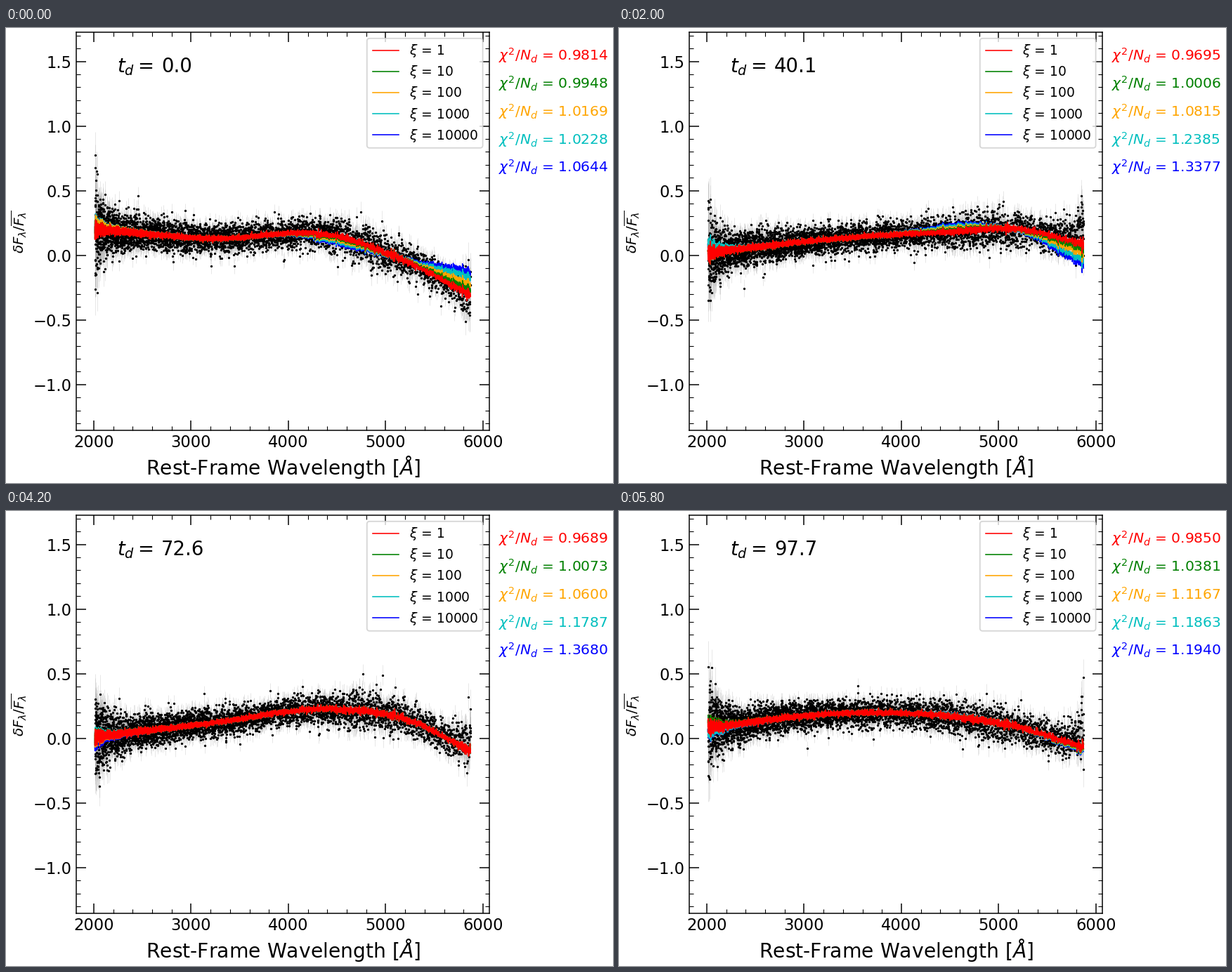
Recreate the animation shown at these times as a matplotlib script. Size 864x648 px, loop 6 s.

```python
import numpy as np
import matplotlib.pyplot as plt
from matplotlib.animation import FuncAnimation
from matplotlib.collections import LineCollection
from matplotlib.patches import FancyBboxPatch
from matplotlib.ticker import AutoMinorLocator, MultipleLocator

W, H = 864, 648
FRAMES, STEP_MS = 30, 200
COLORS = ["red", "green", "orange", "c", "blue"]
STIFFNESS = [0, .2, .45, .75, 1]

# Key epochs: loop position, day, continuum level at KNOTS, readouts per fit
KNOTS = [2012, 3200, 4500, 5200, 5872]
EPOCHS = [0, 3, 7, 13, 17, 24, 29]
DAYS = [0, 13.0, 31.1, 49.1, 61.0, 81.3, 97.7]
LEVELS = [
    [.20, .13, .145, -.045, -.31],
    [.23, .235, .37, .41, .10],
    [.03, .14, .235, .175, -.03],
    [.01, .10, .13, .23, .20],
    [.08, .105, .28, .03, -.38],
    [-.04, .125, .185, .24, .11],
    [.08, .185, .17, .085, -.07],
]
CHI2 = [
    [.9814, .9948, 1.0169, 1.0228, 1.0644],
    [.8772, .8807, .8920, .9068, .9605],
    [.9733, 1.0001, 1.0905, 1.2464, 1.1902],
    [.9656, 1.0011, 1.0725, 1.2306, 1.4852],
    [.9856, 1.0010, 1.0389, 1.1644, 1.4586],
    [.9563, 1.0121, 1.0759, 1.1894, 1.3001],
    [.9850, 1.0381, 1.1167, 1.1863, 1.1940],
]


def at(table, i):
    """Row of an epoch table at loop position i."""
    return np.array([np.interp(i, EPOCHS, column) for column in zip(*table)])


def bump(x, center, width):
    return np.exp(-((x - center) / width) ** 2)


def smooth(x, kx, ky):
    """Cubic Hermite curve through the knots."""
    kx = np.asarray(kx, float)
    m = np.gradient(ky, kx)
    k = np.clip(np.searchsorted(kx, x, side="right") - 1, 0, len(kx) - 2)
    h = kx[k + 1] - kx[k]
    u = (x - kx[k]) / h
    return ((1 + 2 * u) * (1 - u) ** 2 * ky[k] + u * (1 - u) ** 2 * h * m[k]
            + u * u * (3 - 2 * u) * ky[k + 1] + u * u * (u - 1) * h * m[k + 1])


lam = np.geomspace(2012, 5872, 4650)
from_blue, from_red = lam - lam[0], lam[-1] - lam
sigma = (.053 + .10 * np.exp(-from_blue / 80) + .03 * np.exp(-from_blue / 400)
         + .018 * bump(lam, 4800, 500)
         + .07 * np.exp(-from_red / 50) + .025 * np.exp(-from_red / 300))
fit_sigma = .2 * sigma + .01 * bump(lam, 5080, 25)

fig = plt.figure(figsize=(W / 72, H / 72), dpi=72, facecolor="white")

# Plot area
LEFT, RIGHT, TOP, BOTTOM = 99.8, 688, 6, 572.8
ax = fig.add_axes([LEFT / W, 1 - BOTTOM / H, (RIGHT - LEFT) / W, (BOTTOM - TOP) / H])
ax.set_xlim(1819, 6065)
ax.set_ylim(-1.353, 1.7255)
ax.xaxis.set_major_locator(MultipleLocator(1000))
ax.yaxis.set_major_locator(MultipleLocator(.5))
ax.xaxis.set_minor_locator(AutoMinorLocator(5))
ax.yaxis.set_minor_locator(AutoMinorLocator(5))
ax.tick_params(which="both", direction="in", top=True, right=True)
ax.tick_params(which="major", length=14, width=1.5, labelsize=22.6, pad=6.6)
ax.tick_params(which="minor", length=6, width=1.1)
for spine in ax.spines.values():
    spine.set_linewidth(1.5)

bars = LineCollection([], colors="0.6", linewidths=.9, alpha=.25, zorder=1)
ax.add_collection(bars, autolim=False)
dots, = ax.plot([], [], "o", color="black", ms=3.3, mew=0, zorder=2)
fits = [ax.plot([], [], color=c, lw=1.5, zorder=8 - n)[0] for n, c in enumerate(COLORS)]

# Overlay in pixel coordinates for labels and legend
stage = fig.add_axes([0, 0, 1, 1])
stage.set_xlim(0, W)
stage.set_ylim(H, 0)
stage.axis("off")


def label(x, y, text, size, **kw):
    return stage.text(x, y, text, fontsize=size, va="baseline", **kw)


label(394.5, 635.5, r"Rest-Frame Wavelength [$\AA$]", 28.2, ha="center")
label(26, 290.5, r"$\delta F_\lambda/\overline{F_\lambda}$", 20,
      ha="center", rotation=90, rotation_mode="anchor")
label(158, 63.3, r"$t_d =$", 27.5)
day_text = label(220.8, 63.3, "", 27.5)

stage.add_patch(FancyBboxPatch((513.8, 14.8), 164.8, 156,
                               boxstyle="round,pad=0,rounding_size=3.8",
                               fc=(1, 1, 1, .8), ec=(.8, .8, .8, .8), lw=1.8))
chi_texts = []
for n, color in enumerate(COLORS):
    y = 31.5 + 30.1 * n
    stage.plot([521.5, 559], [y, y], color=color, lw=1.6)
    label(574, y + 6.8, rf"$\xi$ = {10 ** n}", 18.8)
    chi_texts.append(label(701, 46 + 39.8 * n, "", 20.3, color=color))


def update(i):
    rng = np.random.default_rng(100 + i)
    levels = at(LEVELS, i)
    best = smooth(lam, KNOTS, levels)
    red_end = levels[-1]

    # Points scatter about the best fit and run high at the red edge
    err = sigma * rng.uniform(.85, 1.15, lam.size)
    excess = .35 * (red_end + .4) * np.exp(-from_red / 90)
    flux = best + excess + err * rng.standard_normal(lam.size)
    dots.set_data(lam, flux)
    low, high = np.column_stack([lam, flux - err]), np.column_stack([lam, flux + err])
    bars.set_segments(np.stack([low, high], axis=1))

    # Stiff fits pull the red end to its average and overshoot before it
    pull = (red_end + .1) * (.25 * bump(lam, 4550, 380) - .8 * bump(lam, lam[-1], 430))
    ripple = fit_sigma * rng.standard_normal(lam.size)
    for line, stiff in zip(fits, STIFFNESS):
        offset = rng.uniform(-.06, .06) * (stiff > 0) * np.exp(-from_blue / 150)
        line.set_data(lam, best + stiff * pull + offset + ripple)

    day_text.set_text(f"{np.interp(i, EPOCHS, DAYS):.1f}")
    for text, chi in zip(chi_texts, at(CHI2, i)):
        text.set_text(rf"$\chi^2/N_d$ = {chi:.4f}")
    return [bars, dots, *fits, day_text, *chi_texts]


anim = FuncAnimation(fig, update, frames=FRAMES, interval=STEP_MS,
                     repeat=True, repeat_delay=0, blit=False)
plt.show()
```
